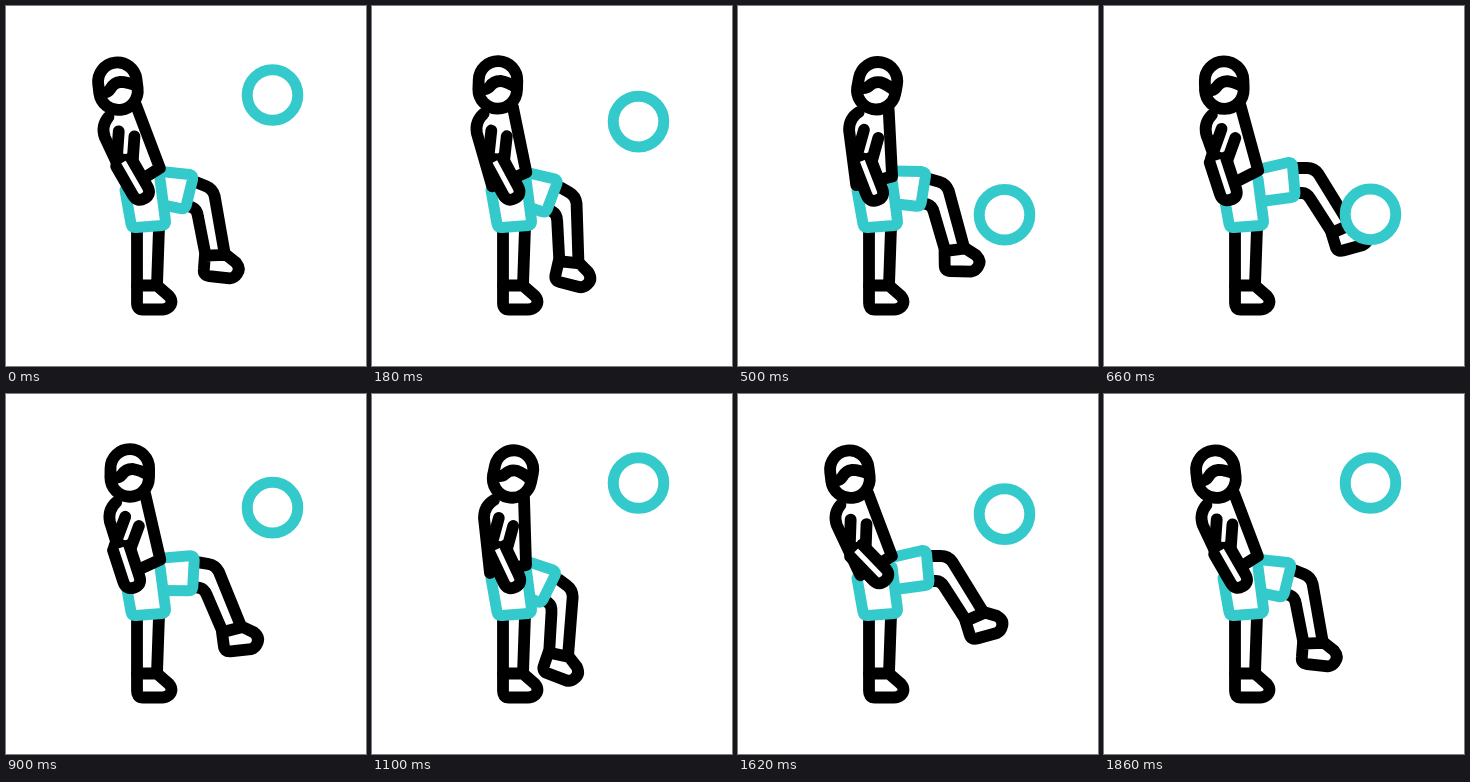
An HTML page for the animation above (2400 ms loop, 360 by 360 pixels).

```html
<!DOCTYPE html>
<html lang="en">
<head>
<meta charset="utf-8">
<title>Keepie-uppie</title>
<style>
html, body { margin: 0; height: 100%; overflow: hidden; background: #fff; }
svg { display: block; width: 100vw; height: 100vh; }
.ink { stroke: #000; stroke-width: 11.8px; }
.cyan { stroke: #34cacc; stroke-width: 11px; }
.solid { fill: #fff; }
</style>
</head>
<body>
<svg viewBox="0 0 360 360" fill="none" stroke-linecap="round" stroke-linejoin="round">
  <g class="ink">
    <path d="M131 222V280M153 222L151 279"/>
    <path class="solid" d="M131 279.5H151L163 290Q168 296 163 301Q160 303.500 156 303.500H137Q131 303.500 131 297Z"/>
  </g>
  <g id="thigh">
    <g id="shin" class="ink">
      <path d="M193 162H203Q210 162 214.500 168L244 216M194 187H198Q203 187 206.500 193L229 228"/>
      <path class="solid" d="M227.500 227L247 218.500L259 222Q266 226 264 232.500Q263 237 259 239L239 244.500Q233 246 231.500 240Z"/>
    </g>
    <path class="cyan solid" d="M156 163L184 156.500Q188 156 188.500 160L191 187Q191 191 187 191.500L161 195"/>
  </g>
  <path class="cyan solid" d="M119 184L125 218Q126 222 130 221.500L156 219.500Q160 219 159.500 215L154 173"/>
  <g id="torso" class="ink">
    <path d="M122 106Q112 112 112 124L118 179M152 104L154 171L133 176"/>
    <g transform="translate(141 80) rotate(12)">
      <rect class="solid" x="-19.300" y="-23.800" width="38.600" height="47.600" rx="19.300"/>
      <path d="M-19 5Q-11 6 -8 2Q-4 -4 3 -4Q10 -3 19 2"/>
    </g>
  </g>
  <g id="arm" class="ink">
    <path d="M-8 -2V30M8 2V26M-8 26H8"/>
    <path id="forearm" class="solid" d="M-8.500 -2V31Q-8.500 40 0 40Q8.500 40 8.500 31V-2"/>
  </g>
  <circle id="ball" class="cyan solid" cx="266.500" r="25.300"/>
</svg>
<script>
const LOOP = 2400, MOVE = 1860;
const HIP = { x: 127, y: 167 };
const TOP = 89, KICK = 224;   // ball heights
const LEAN = -19;             // torso, leaning back
const REST = 19, BACK = 32;   // thigh angles, 0 is fully raised

const smooth = u => u * u * (3 - 2 * u);
const slowing = u => u * (2 - u);

// Eases between [time, value] stops, with one curve for rising and one for falling values.
function glide(t, stops, up = smooth, down = smooth) {
  const i = Math.max(1, stops.findIndex(([time]) => t <= time));
  const [t0, a] = stops[i - 1], [t1, b] = stops[i];
  return a + (b - a) * (b > a ? up : down)((t - t0) / (t1 - t0));
}

const motion = {
  ball: t => glide(t, [[0, TOP], [632, KICK], [1100, TOP], [1360, KICK], [MOVE, TOP]], smooth, slowing),
  torso: t => glide(t, [[0, LEAN], [370, 0], [450, 0], [775, LEAN], [1060, 0], [1200, 0], [1540, LEAN], [MOVE, LEAN]]),
  thigh: t => glide(t, [[0, REST], [340, BACK], [640, 0], [790, 0], [1120, BACK], [1580, 0], [1640, 0], [MOVE, REST]]),
  arm: t => glide(t, [[0, 4], [800, 21], [1620, 2], [MOVE, 4]]),
  forearm: t => glide(t, [[0, -30], [800, -17], [1620, -44], [MOVE, -30]])
};

const part = id => document.getElementById(id);
const pose = (id, transform) => part(id).setAttribute('transform', transform);

function draw(now) {
  const t = Math.min(now % LOOP, MOVE);
  const torso = motion.torso(t), thigh = motion.thigh(t), arm = motion.arm(t);

  pose('torso', `rotate(${torso} ${HIP.x} ${HIP.y})`);
  pose('thigh', `rotate(${thigh} 148 161)`);
  pose('shin', `rotate(${thigh * 0.14} 200 174)`);

  // The shoulder follows the torso while the arm keeps its own angle.
  const r = torso * Math.PI / 180, c = Math.cos(r), s = Math.sin(r);
  const x = HIP.x + 7 * c + 40 * s, y = HIP.y + 7 * s - 39 * c;
  pose('arm', `translate(${x} ${y}) rotate(${arm})`);
  pose('forearm', `translate(0 30) rotate(${motion.forearm(t) - arm})`);

  part('ball').setAttribute('cy', motion.ball(t));
}

let start;
function tick(now) {
  start ??= now;
  draw(now - start);
  requestAnimationFrame(tick);
}
draw(0);
requestAnimationFrame(tick);
</script>
</body>
</html>
```
